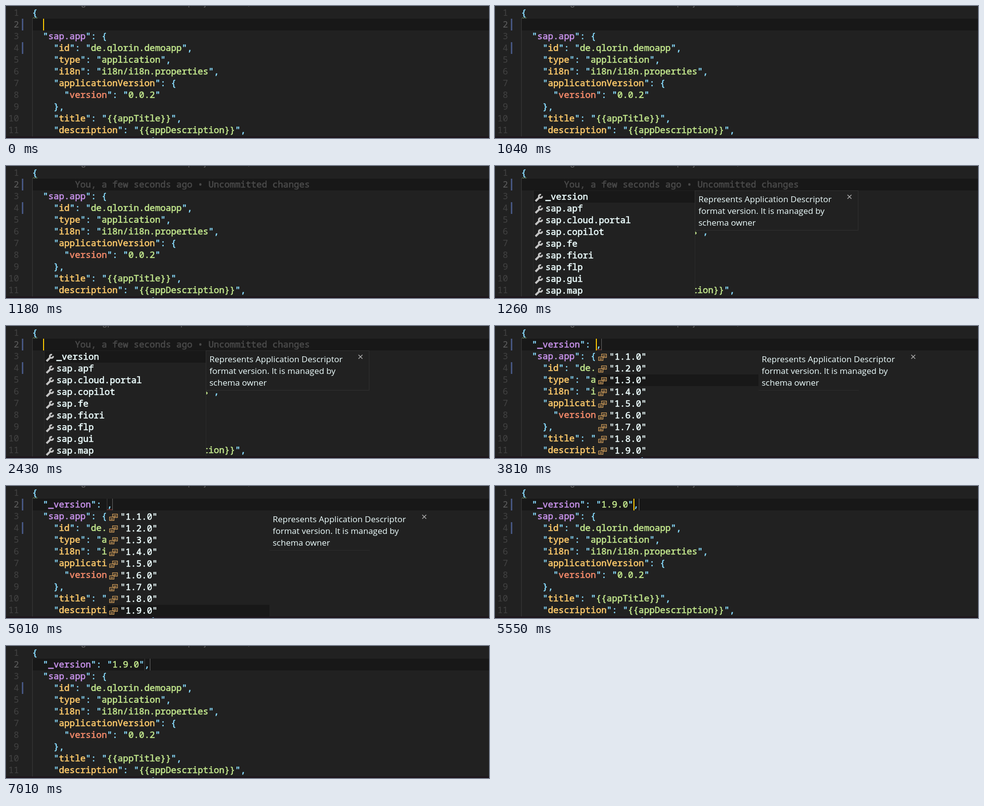
An HTML page with a canvas for the animation above (7470 ms loop, 977 by 270 pixels).

```html
<!DOCTYPE html>
<html lang="en">
<head>
<meta charset="utf-8">
<title>Manifest code completion</title>
<style>
html, body { margin: 0; width: 977px; height: 270px; overflow: hidden; background: #212121; }
canvas { display: block; }
</style>
</head>
<body>
<canvas id="stage" width="977" height="270"></canvas>
<script>
const ctx = document.getElementById('stage').getContext('2d');
const LOOP = 7470, LEFT = 53, CHAR = 10.8, ROW = 24;
const MONO = '18px "Noto Sans Mono", monospace';
const SANS = '17px "Open Sans", sans-serif';
const BG = '#212121', ACTIVE = '#181818', PUNCT = '#89ddff', STRING = '#c3e88d', BRIGHT = '#eeffff';
const BAR = '#465680';
const KEY = { 2: '#c792ea', 4: '#ffcb6b', 6: '#f78c6c' };

const LINES = [
  '{', '',
  '  "sap.app": {',
  '    "id": "de.qlorin.demoapp",',
  '    "type": "application",',
  '    "i18n": "i18n/i18n.properties",',
  '    "applicationVersion": {',
  '      "version": "0.0.2"',
  '    },',
  '    "title": "{{appTitle}}",',
  '    "description": "{{appDescription}}",'
];
const PROPS = ['_version', ...['apf', 'cloud.portal', 'copilot', 'fe', 'fiori', 'flp', 'gui', 'map'].map(n => 'sap.' + n)];
const VERSIONS = Array.from({ length: 9 }, (_, i) => `"1.${i + 1}.0"`);
const DOC = ['Represents Application Descriptor', 'format version. It is managed by', 'schema owner'];

// Times of the main events, in ms
const NOTE = 1180, MENU = 1260, INSERT = 2650, ERROR = 3270, ACCEPT = 5550, SAVED = 5780, VALID = 6390;
const BLINKS = [0, 60, 500, 1040, 1500, 1990, 2430, 3130, 3580, 4030, 4480, 5010, 5550, 6010, 6550, 7010];
const STEPS = [3580, 3730, 3810, 3950, 4110, 4250, 4330, 4480, 4550];

const passed = (times, t) => times.filter(x => x <= t).length;
const rowTop = n => 2 + ROW * (n - 1);

function rect(x, y, w, h, color) {
  ctx.fillStyle = color;
  ctx.fillRect(x, y, w, h);
}

function text(s, x, y, color, font = MONO) {
  ctx.font = font;
  ctx.fillStyle = color;
  ctx.fillText(s, x, y);
}

// Medium weight: regular glyphs with a thin outline
function strong(s, x, y, color) {
  text(s, x, y, color);
  ctx.strokeStyle = color;
  ctx.lineWidth = 0.6;
  ctx.strokeText(s, x, y);
}

function stroke(points, color, width = 1) {
  ctx.strokeStyle = color;
  ctx.lineWidth = width;
  ctx.beginPath();
  points.forEach(([x, y]) => ctx.lineTo(x, y));
  ctx.stroke();
}

function codeLine(line, n) {
  const indent = line.search(/\S/);
  for (const m of line.matchAll(/"([^"]*)"(:?)|[^\s"]+/g)) {
    const put = (s, offset, color) => strong(s, LEFT + (m.index + offset) * CHAR, rowTop(n) + 18, color);
    if (m[1] === undefined) { put(m[0], 0, PUNCT); continue; }
    put('"', 0, PUNCT);
    put(m[1], 1, m[2] ? KEY[indent] : STRING);
    put('"' + m[2], m[1].length + 1, PUNCT);
  }
}

function squiggle(x, y, color) {
  stroke(Array.from({ length: 6 }, (_, i) => [x + i * 2, y + (i % 2 ? 0 : 2)]), color);
}

function wrench(x, y) {
  stroke([[x + 2, y + 15], [x + 10, y + 7]], '#c5c5c5', 4);
  ctx.lineWidth = 3.4;
  ctx.beginPath();
  ctx.arc(x + 12, y + 5, 3.4, -0.1, Math.PI * 1.6);
  ctx.stroke();
}

function enumIcon(x, y) {
  const color = '#d9a35c';
  const box = (bx, by, w, h) => {
    rect(bx, by, w, h, BG);
    ctx.strokeStyle = color;
    ctx.lineWidth = 1.2;
    ctx.strokeRect(bx, by, w, h);
    for (const dy of [2.5, 4.5]) rect(bx + 2, by + dy, w - 4, 1, color);
  };
  box(x + 6.5, y + 0.5, 10, 7);
  box(x + 0.5, y + 6.5, 9, 7);
}

function popup(x, items, selected, icon, iconX, textX) {
  rect(x, 51, 328, 216, BG);
  rect(x, 51 + selected * ROW, 328, ROW, ACTIVE);
  items.forEach((item, i) => {
    const y = 51 + i * ROW;
    icon(iconX, y + 6);
    strong(item, textX, y + 18, BRIGHT);
  });
}

function docBox(x, width, closeX) {
  rect(x, 51, width, 80, BG);
  DOC.forEach((s, i) => text(s, x + 6.5, 74 + i * ROW, BRIGHT, SANS));
  stroke([[closeX - 4, 59], [closeX + 4, 67]], '#b0b0b0', 1.5);
  stroke([[closeX + 4, 59], [closeX - 4, 67]], '#b0b0b0', 1.5);
}

function lensRemnants(t) {
  const marks = t >= 1620 && t < 3500
    ? { g: 196, p: 205, '|': 351, ',': 488 }
    : { g: 153, '|': 366, j: 401, ',': 490 };
  for (const s in marks) text(s, marks[s], -1, '#777', '14px "Open Sans", sans-serif');
}

function draw(t) {
  const menu = t >= MENU && t < INSERT;
  const values = t >= INSERT && t < ACCEPT;
  const done = t >= ACCEPT;

  rect(0, 0, 977, 270, BG);
  lensRemnants(t);
  rect(54, 26, 923, ROW, ACTIVE);
  rect(53, 26, 1, 241, '#3a3a3a');
  rect(0, 267, 977, 3, '#1c141b');

  ctx.textAlign = 'right';
  LINES.forEach((_, i) => text(i + 1, 26.4, rowTop(i + 1) + 18, i === 1 ? '#606060' : '#424242'));
  ctx.textAlign = 'left';
  if (t < SAVED) rect(32, 26, 3, ROW, BAR);
  rect(32, 74, 3, ROW, BAR);

  LINES.forEach((line, i) => codeLine(line, i + 1));
  if (!menu) strong('{', LEFT + 22 * CHAR, rowTop(12) + 16, PUNCT);
  if (t < VALID) squiggle(54, 23.5, '#7fa873');

  if (t >= NOTE && t < INSERT) {
    strong('You, a few seconds ago • Uncommitted changes', LEFT + 8 * CHAR, 44, '#4a4a4a');
  }
  if (values || done) {
    codeLine(done ? '  "_version": "1.9.0",' : '  "_version": ,', 2);
    const stop = done ? 280 : 204;
    rect(stop, 26, 1, ROW, '#3d3d3d');
    rect(stop + 11, 26, 1, ROW, '#666');
  }

  if (menu) {
    popup(77, PROPS, 0, wrench, 80, 102);
    docBox(405, 329, 717);
    ctx.strokeStyle = '#303030';
    ctx.lineWidth = 1;
    ctx.strokeRect(404.5, 50.5, 330, 81);
    rect(77, 50, 1, 217, '#2b2b2b');
    rect(404, 131, 1, 136, '#2b2b2b');
  }
  if (values) {
    const step = passed(STEPS, t);
    popup(205, VERSIONS, (step + 8) % 9, enumIcon, 209, 231);
    docBox(533, 330, 846);
    rect(533, 131, 203, 1, '#2b2b2b');
    if (t >= ERROR) squiggle(204.5, 47.5, '#d0453f');
  }

  if (passed(BLINKS, t) % 2) rect(done ? 280 : values ? 204 : 75, 26, 2, ROW, '#ffcc00');
}

function tick() {
  draw(performance.now() % LOOP);
  requestAnimationFrame(tick);
}
tick();
</script>
</body>
</html>
```
